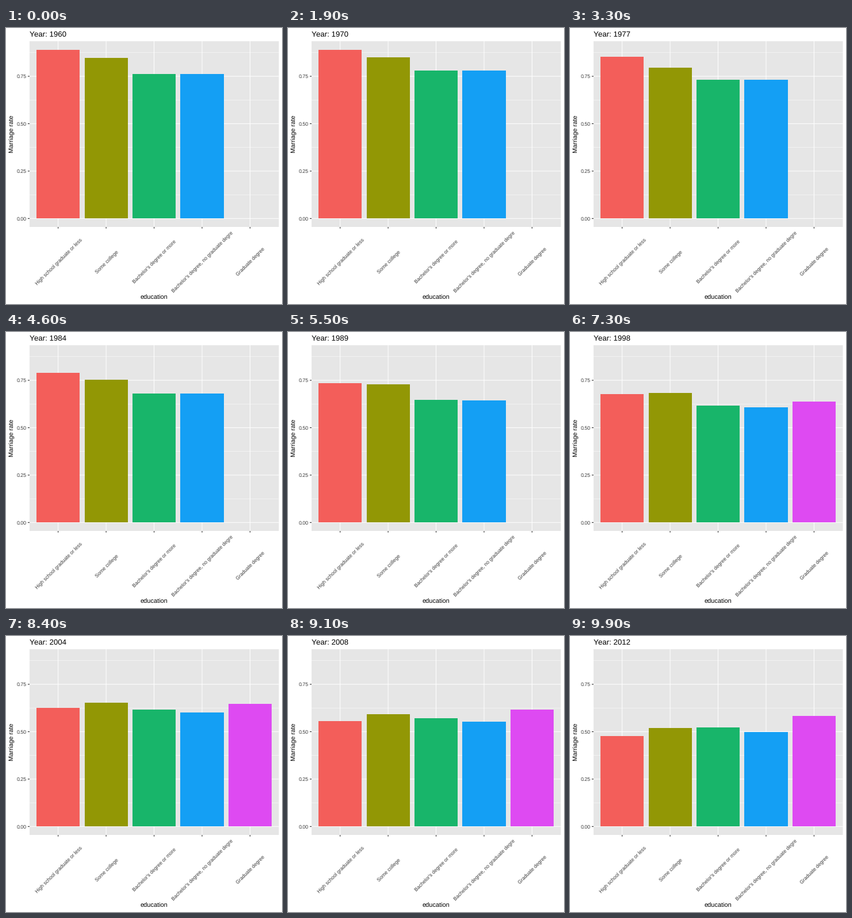
Write a matplotlib script that moves like this. It is 480 by 480 pixels and loops after 10 s.

```python
import numpy as np
import matplotlib.pyplot as plt
from matplotlib.animation import FuncAnimation
from matplotlib.patches import Rectangle

plt.rcParams["font.family"] = "Liberation Sans"
plt.rcParams["text.hinting"] = "none"
plt.rcParams["toolbar"] = "None"

SIZE, DPI = 480, 72
FRAMES, INTERVAL = 100, 100
FIRST, LAST = 1960, 2012
GRADUATE_START = 1990

# Panel geometry in pixels, y pointing down
LEFT, RIGHT, TOP, BOTTOM = 41, 474.5, 23, 346
ZERO, UNIT = 331.3, 329.77
FIRST_X, STEP = 90.66, 83.44
HALF = 0.45 * STEP

AXIS_TEXT, TICK = "#3d3d3d", "#242424"


def trend(*rates):
    """Straight runs between the rates of five decades and two later years."""
    years = [*range(1960, 2001, 10), 2004, LAST]
    return lambda year: np.interp(year, years, rates)


def since_1980(year):
    return max(0, (year - 1980) / (LAST - 1980))


high_school = trend(0.8905, 0.8906, 0.8383, 0.7223, 0.6683, 0.629, 0.477)
some_college = trend(0.8477, 0.8505, 0.7763, 0.7219, 0.6751, 0.656, 0.5196)
bachelor = trend(0.7610, 0.7813, 0.7118, 0.6387, 0.6125, 0.617, 0.523)


def bachelor_only(year):
    return bachelor(year) - 0.025 * since_1980(year) ** 2


def graduate(year):
    if round(year) < GRADUATE_START:
        return 0
    return bachelor(year) + 0.011 + 0.0495 * since_1980(year) ** 3


GROUPS = [
    ("High school graduate or less", "#f35e5a", high_school),
    ("Some college", "#929705", some_college),
    ("Bachelor's degree or more", "#18b56a", bachelor),
    ("Bachelor's degree, no graduate degre", "#149ff4", bachelor_only),
    ("Graduate degree", "#de4af2", graduate),
]

fig = plt.figure(figsize=(SIZE / DPI, SIZE / DPI), dpi=DPI, facecolor="white")
ax = fig.add_axes([0, 0, 1, 1])
ax.set_xlim(0, SIZE)
ax.set_ylim(SIZE, 0)
ax.axis("off")


def line(x0, y0, x1, y1, color="white", width=1.07):
    ax.plot([x0, x1], [y0, y1], color=color, lw=width, zorder=1,
            solid_capstyle="butt", snap=False)


def label(x, y, text, size, color="black", **kw):
    return ax.text(x, y, text, fontsize=size, color=color, **kw)


def y_of(rate):
    return ZERO - rate * UNIT


ax.add_patch(Rectangle((LEFT, TOP), RIGHT - LEFT, BOTTOM - TOP,
                       fc="#e6e6e6", lw=0, snap=False, zorder=0))

for rate in np.arange(0, 1, 0.25):
    y, between = y_of(rate), y_of(rate + 0.125)
    line(LEFT, between, RIGHT, between, width=0.53)
    line(LEFT, y, RIGHT, y)
    line(37.9, y, LEFT, y, TICK)
    label(35.65, y + 3.15, f"{rate:.2f}", 8.8, AXIS_TEXT, ha="right")

bars = []
for k, (name, color, _) in enumerate(GROUPS):
    x = FIRST_X + k * STEP
    line(x, TOP, x, BOTTOM)
    line(x, BOTTOM, x, BOTTOM + 2.75, TICK)
    label(x + 1.4, 407, name, 8.8, AXIS_TEXT, rotation=45, ha="center", va="center")
    x0, x1 = round(x - HALF), round(x + HALF)
    bar = Rectangle((x0, round(ZERO)), x1 - x0, 0, fc=color, lw=0,
                    antialiased=False, zorder=2)
    bars.append(ax.add_patch(bar))

label(257.5, 472, "education", 11, ha="center")
label(14, 184.5, "Marriage rate", 11, rotation=90, rotation_mode="anchor",
      ha="center", va="baseline")

# The capital stands apart so that it is not kerned into the next letter
label(40.6, 15, "Y", 13.2)
title = label(49.4, 15, "", 13.2)


def draw(i):
    year = FIRST + (LAST - FIRST) * i / (FRAMES - 1)
    title.set_text(f"ear: {round(year)}")
    base = round(ZERO)
    for bar, (_, _, rate) in zip(bars, GROUPS):
        top = round(y_of(rate(year)))
        bar.set_y(top)
        bar.set_height(base - top)
        bar.set_visible(top < base)
    return [title, *bars]


anim = FuncAnimation(fig, draw, frames=FRAMES, interval=INTERVAL,
                     init_func=lambda: draw(0), repeat=True, repeat_delay=0)
plt.show()
```
